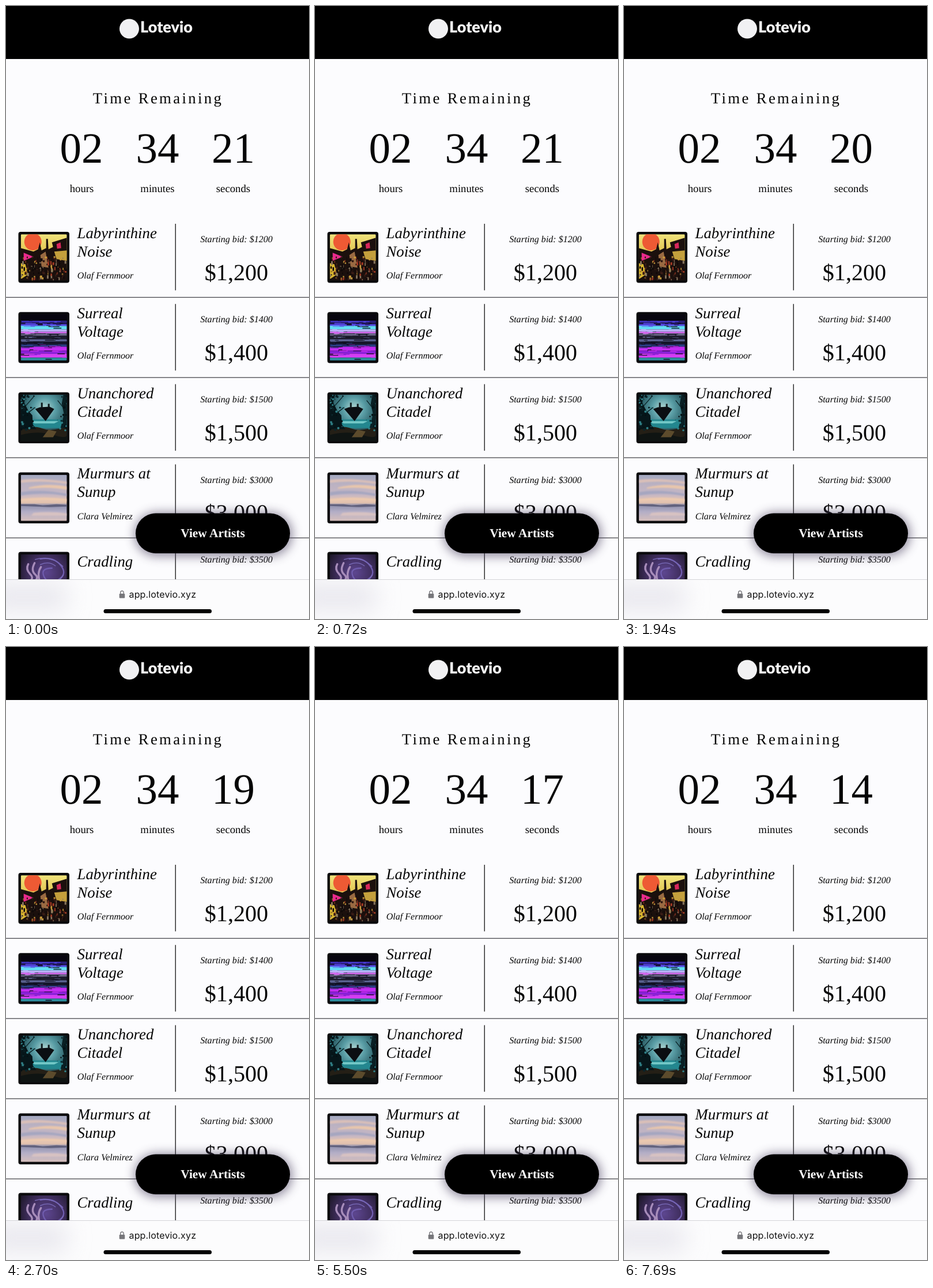
These frames come from a looping animation (526x1064 px, 8000 ms). An HTML page:

```html
<!DOCTYPE html>
<html lang="en">
<head>
<meta charset="utf-8">
<title>Auction countdown</title>
<style>
  html, body { margin: 0; width: 100%; height: 100%; overflow: hidden; background: #fcfcfe; }
  svg { display: block; }
  #stage { width: 100%; height: 100%; }
  text { font-family: "Liberation Serif", "Times New Roman", serif; fill: #050505; text-rendering: geometricPrecision; }
  .mid { text-anchor: middle; }
  .heading { font-size: 26.77px; letter-spacing: 3.35px; }
  .digits { font-size: 74.95px; }
  .unit { font-size: 18.74px; }
  .title { font-size: 26.77px; font-style: italic; }
  .small { font-size: 16.06px; font-style: italic; }
  .price { font-size: 40.15px; }
  .button { font-size: 21.4px; font-weight: 700; fill: #fff; }
  .brand { font: 900 27px Lato, sans-serif; fill: #f6f6f6; }
  .address { font: 400 16px Inter, sans-serif; fill: #111; letter-spacing: .15px; }
</style>
</head>
<body>
<svg id="stage" viewBox="0 0 526 1064" preserveAspectRatio="none">
  <defs>
    <clipPath id="frame"><rect width="80" height="80" rx="1.5"/></clipPath>
    <filter id="soft" x="-30%" y="-80%" width="160%" height="260%"><feGaussianBlur stdDeviation="9"/></filter>
    <filter id="haze" x="-60%" y="-120%" width="220%" height="340%"><feGaussianBlur stdDeviation="20"/></filter>
    <filter id="blur"><feGaussianBlur stdDeviation="1"/></filter>
    <linearGradient id="city" x2="0" y2="1">
      <stop stop-color="#f0e47c"/><stop offset=".45" stop-color="#e0c04a"/><stop offset="1" stop-color="#2a1510"/>
    </linearGradient>
    <radialGradient id="lagoon" cx=".52" cy=".3" r=".66">
      <stop stop-color="#b4d8d4"/><stop offset=".35" stop-color="#5a9ea6"/><stop offset="1" stop-color="#0b3038"/>
    </radialGradient>
    <linearGradient id="sky" x2="0" y2="1">
      <stop stop-color="#a3a8c0"/><stop offset=".22" stop-color="#bcb2c2"/><stop offset=".42" stop-color="#c4b6c4"/>
      <stop offset=".6" stop-color="#e6c4ae"/><stop offset=".66" stop-color="#8f90ad"/>
      <stop offset=".8" stop-color="#b3aec6"/><stop offset="1" stop-color="#d6bfbc"/>
    </linearGradient>
    <radialGradient id="violet" cx=".55" cy=".4" r=".65">
      <stop stop-color="#5d4690"/><stop offset=".6" stop-color="#3d2c5a"/><stop offset="1" stop-color="#1e182a"/>
    </radialGradient>

    <g id="art0">
      <rect width="80" height="80" fill="url(#city)"/>
      <circle cx="21" cy="13" r="15" fill="#ee5a34"/>
      <path d="M0 24 22 30 30 26 33 14 36 28 44 24 44 8 47 8 48 26 56 22 54 14 80 6V80H0Z" fill="#1b100d"/>
      <path d="M5 32 22 39 5 46Z" fill="#ea2a8c"/>
      <path d="M62 17 69 14 70 24 63 25Z" fill="#d8275c"/>
      <path d="M58 30 80 28V46L62 43Z" fill="#c4a03c"/>
      <path d="M34 36 43 30 48 58 36 56Z" fill="#9a6a42"/>
      <path d="M0 50 8 52 12 70 0 78Z" fill="#d9b62f"/>
    </g>
    <g id="art1"><rect width="80" height="80" fill="#100c1c"/></g>
    <g id="art2">
      <rect width="80" height="80" fill="url(#lagoon)"/>
      <rect y="43" width="80" height="15" fill="#23878f"/>
      <path d="M18 46H66L58 50H24Z" fill="#74c9c8"/>
      <path d="M0 58Q22 53 38 59T80 55V80H0Z" fill="#241f16"/>
      <path d="M0 70Q30 62 56 70T80 68V80H0Z" fill="#0f1412"/>
      <path d="M38 74 48 61 62 64 56 74Z" fill="#5c4b2c"/>
      <path d="M0 0H9L6 14 13 28 20 36 21 52 27 60H0Z" fill="#06161a"/>
      <path d="M80 0H74L71 16 75 34 69 58H80Z" fill="#0a2024"/>
      <path d="M8 20 22 4M12 32 25 22M75 24 64 10" stroke="#0a2327" stroke-width="1.4"/>
      <path d="M25 25 33 22 50 21 58 25 43 46Z" fill="#0b0e12"/>
      <path d="M35 23V14H38V23M47 22V16H50V22" fill="#10191c"/>
    </g>
    <g id="art3">
      <rect width="80" height="80" fill="url(#sky)"/>
      <g filter="url(#blur)">
        <path d="M0 9Q28 4 80 12V16Q40 9 0 14Z" fill="#dabfb8"/>
        <path d="M14 22Q45 14 80 20V26Q48 20 14 24Z" fill="#e8c6ac"/>
        <path d="M0 30Q35 24 80 33V37Q44 29 0 36Z" fill="#a5a6c0"/>
        <path d="M0 42Q40 37 80 42V46Q40 43 0 46Z" fill="#ecc9ae"/>
        <path d="M22 66Q52 63 80 67V71H18Z" fill="#d8c2c2"/>
      </g>
      <path d="M0 51H24L38 53 62 51 80 52V55L50 56 0 54Z" fill="#62627e"/>
    </g>
    <g id="art4">
      <rect width="80" height="80" fill="url(#violet)"/>
      <g fill="none" stroke-linecap="round">
        <path d="M34 8Q58 4 70 20T62 46Q46 52 40 38T54 24" stroke="#6f5cae" stroke-width="2.4"/>
        <path d="M25 9Q52 1 73 21M40 50Q62 56 74 36M34 18Q48 11 60 20" stroke="#7a6cba" stroke-width="1.3"/>
        <path d="M13 17Q8 26 16 34T14 48M24 15Q17 28 25 35T21 48M35 22Q28 32 33 48" stroke="#a78cba" stroke-width="3.4"/>
      </g>
    </g>
  </defs>

  <rect width="526" height="1064" fill="#fcfcfe"/>
  <rect width="526" height="92"/>
  <circle cx="214" cy="39.5" r="17" fill="#f1f1f3"/>
  <text class="brand" x="233" y="46">Lotevio</text>

  <text class="heading mid" x="264" y="169">Time Remaining</text>
  <g class="mid">
    <text class="digits" x="131" y="272.2">02</text>
    <text class="digits" x="263" y="272.2">34</text>
    <text class="digits" id="sec" x="394.5" y="272.2">21</text>
    <text class="unit" x="131.5" y="323">hours</text>
    <text class="unit" x="263" y="323">minutes</text>
    <text class="unit" x="394.5" y="323">seconds</text>
  </g>

  <g id="rows"></g>

  <rect x="223" y="879" width="274" height="76" rx="38" fill="#4c4260" opacity=".62" filter="url(#soft)"/>
  <rect x="225" y="880.5" width="268" height="69.5" rx="34.75"/>
  <text class="button mid" x="359" y="922">View Artists</text>

  <svg y="995" width="526" height="69" viewBox="0 995 526 69">
    <rect y="995" width="526" height="69" fill="#fcfcfd"/>
    <rect x="-30" y="1002" width="136" height="48" fill="#dcdae4" opacity=".6" filter="url(#haze)"/>
    <rect y="995" width="526" height="1" fill="#d4d4d8"/>
  </svg>
  <rect x="196.7" y="1020" width="9.6" height="7.8" rx="1.3" fill="#77777b"/>
  <path d="M198.7 1020.5V1018a2.8 2.8 0 0 1 5.6 0V1020.5" fill="none" stroke="#77777b" stroke-width="1.4"/>
  <text class="address" x="213.5" y="1027">app.lotevio.xyz</text>
  <rect x="169.5" y="1047" width="187.5" height="7" rx="3.5"/>
</svg>

<script>
const NS = "http://www.w3.org/2000/svg";
const byId = id => document.getElementById(id);

function add(parent, tag, attrs, text) {
  const el = document.createElementNS(NS, tag);
  for (const key in attrs) el.setAttribute(key, attrs[key]);
  if (text) el.textContent = text;
  parent.appendChild(el);
  return el;
}

function seeded(seed) {
  return () => (seed = (seed * 16807) % 2147483647) / 2147483647;
}

function paintCity() {
  const rnd = seeded(77), art = byId("art0");
  const tones = ["#0c0808", "#3b1e17", "#140b0b", "#a33a24", "#c79b3a", "#140b0b", "#8b7961"];
  for (let i = 0; i < 150; i++) {
    add(art, "rect", {
      x: rnd() * 78, y: 38 + rnd() * 40,
      width: .8 + rnd() * 3, height: 1 + rnd() * 6,
      fill: tones[Math.floor(rnd() * tones.length)]
    });
  }
}

function paintGlitch() {
  const rnd = seeded(41), art = byId("art1");
  // Bands: top edge and main colour
  const bands = [[0, "#08060f"], [11, "#3f2fc0"], [14, "#1d1450"], [17, "#5a4df0"], [20, "#63dcf4"],
    [26, "#b9b2f8"], [30, "#d56cf0"], [33, "#6b6888"], [37, "#1c1c2c"], [43, "#59618e"],
    [47, "#15162a"], [52, "#2a3d83"], [56, "#c22af0"], [63, "#8a20d8"], [68, "#d43df4"], [75, "#2c8c9c"]];
  bands.forEach(([y, fill], i) => {
    const end = i + 1 < bands.length ? bands[i + 1][0] : 80;
    add(art, "rect", { y, width: 80, height: end - y, fill });
  });
  for (let i = 0; i < 130; i++) {
    const y = 9 + rnd() * 69;
    const near = bands.filter(b => b[0] <= y + rnd() * 10 - 5).pop() || bands[0];
    add(art, "rect", {
      x: rnd() * 80 - 8, y, width: 3 + rnd() * 17, height: .6 + rnd() * 1.2,
      fill: rnd() < .25 ? "#0d0b1d" : near[1]
    });
  }
}

// Leaves along both edges of the lagoon
function paintLeaves() {
  const rnd = seeded(19), art = byId("art2");
  const tones = ["#06161a", "#0a2328", "#041013", "#2f7f86"];
  for (let i = 0; i < 90; i++) {
    const depth = rnd() * rnd() * 26;
    add(art, "circle", {
      cx: rnd() < .65 ? depth : 80 - depth * .7, cy: rnd() * 62, r: .5 + rnd() * 1.6,
      fill: tones[Math.floor(rnd() * tones.length)]
    });
  }
}

const lots = [
  ["Labyrinthine|Noise", "Olaf Fernmoor", 1200],
  ["Surreal|Voltage", "Olaf Fernmoor", 1400],
  ["Unanchored|Citadel", "Olaf Fernmoor", 1500],
  ["Murmurs at|Sunup", "Clara Velmirez", 3000],
  ["Cradling", "", 3500]
];

function buildRow([title, artist, bid], i) {
  const last = i === lots.length - 1;
  const row = add(byId("rows"), "g", { transform: `translate(0 ${i * 139.2 - (last ? 1.3 : 0)})` });
  add(row, "rect", { x: 21.5, y: 392, width: 88.5, height: 88.5, rx: 4, fill: "#0a0a0c" });
  const art = add(row, "g", { transform: "translate(25.7 396.2)", "clip-path": "url(#frame)" });
  add(art, "use", { href: "#art" + i });
  title.split("|").forEach((line, n) => {
    add(row, "text", { class: "title", x: 123.5, y: (last ? 417.5 : 402.5) + n * 32.1 }, line);
  });
  add(row, "text", { class: "small", x: 123.7, y: 473 }, artist);
  add(row, "rect", { x: 293.6, y: 378, width: 1.3, height: 115.5, fill: "#111" });
  add(row, "text", { class: "small mid", x: 400, y: 410 }, "Starting bid: $" + bid);
  add(row, "text", { class: "price mid", x: 400, y: 475.6 }, "$" + bid.toLocaleString("en-US"));
  if (!last) add(row, "rect", { y: 505, width: 526, height: 1.3, fill: "#4a4a4e" });
}

paintCity();
paintGlitch();
paintLeaves();
lots.forEach(buildRow);

const LOOP = 8000;
const ticks = [780, 2700, 3680, 4680, 5680, 6690, 7690];
const sec = byId("sec");

function draw() {
  const t = performance.now() % LOOP;
  const value = String(21 - ticks.filter(at => t >= at).length);
  if (sec.textContent !== value) sec.textContent = value;
  requestAnimationFrame(draw);
}
draw();
</script>
</body>
</html>
```
